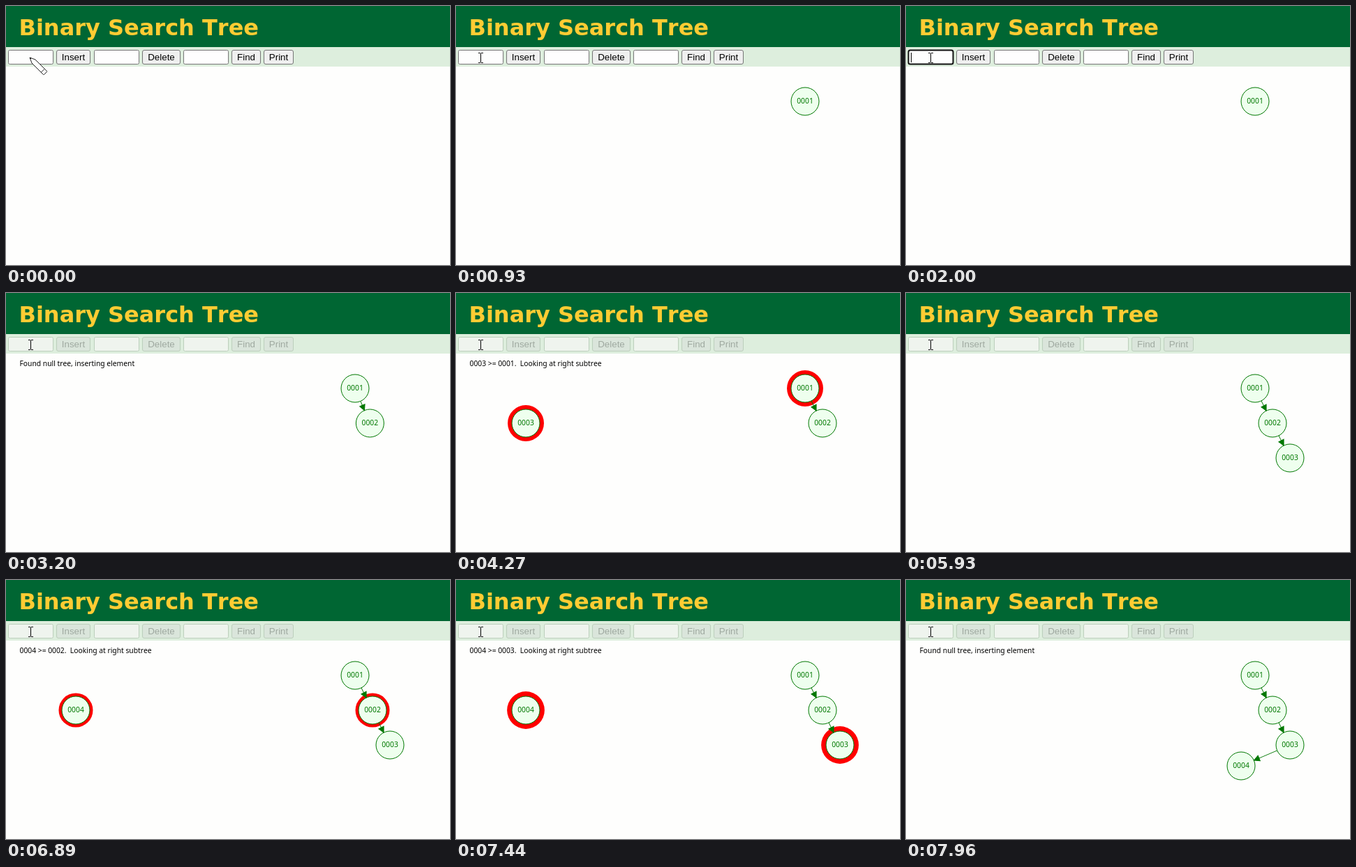
Animation, 636 px wide and 372 px high, one loop 8000 ms. Source, as an HTML page with a canvas:

```html
<!DOCTYPE html>
<html lang="en">
<head>
<meta charset="utf-8">
<title>Binary Search Tree</title>
<style>
  html, body { margin: 0; width: 100%; height: 100%; overflow: hidden; background: #fefefd; }
  canvas { display: block; }
</style>
</head>
<body>
<canvas id="stage" width="636" height="372"></canvas>
<script>
const ctx = document.getElementById('stage').getContext('2d');
const LOOP = 8000, RADIUS = 20, GREEN = '#007700';
const SMALL = '10.3px "Noto Sans", sans-serif';
const CONTROL = '13.33px "Liberation Sans", Arial, sans-serif';

// Times in ms: the user's actions, then the phases of each insertion.
const inserts = [
  { id: 1, focus: 70, typed: 440, enter: 580, shown: 580, end: 890 },
  { id: 2, focus: 2000, typed: 2200, enter: 2370, shown: 2370, compare: 2680, block: 230, move: 2970, moved: 3203, end: 3310 },
  { id: 3, focus: 3510, typed: 3680, enter: 3820, shown: 3890, compare: 4100, block: 290, move: 5100, moved: 5345, end: 5410 },
  { id: 4, focus: 5650, typed: 5720, enter: 5930, shown: 6000, compare: 6240, block: 285, move: 7765, moved: 8010, end: 8100 }
];
const inputs = [3, 126, 254];
const buttons = [['Insert', 72, 49], ['Delete', 195, 55], ['Find', 323, 42], ['Print', 369, 43]];

const name = id => String(id).padStart(4, '0');
const home = id => ({ x: 475 + 25 * id, y: 87 + 50 * id });
const clamp01 = v => Math.max(0, Math.min(1, v));
const mix = (a, b, k) => ({ x: a.x + (b.x - a.x) * k, y: a.y + (b.y - a.y) * k });

function text(str, x, y, font, color, align = 'left') {
  ctx.font = font;
  ctx.fillStyle = color;
  ctx.textAlign = align;
  ctx.fillText(str, x, y);
}

function box(x, y, w, h, r, fill, stroke, line = 1) {
  ctx.beginPath();
  ctx.roundRect(x, y, w, h, r);
  ctx.fillStyle = fill;
  ctx.fill();
  ctx.strokeStyle = stroke;
  ctx.lineWidth = line;
  ctx.stroke();
}

function polygon(points) {
  ctx.beginPath();
  points.forEach(([x, y]) => ctx.lineTo(x, y));
  ctx.closePath();
}

function disc(p, r) {
  ctx.beginPath();
  ctx.arc(p.x, p.y, r, 0, 2 * Math.PI);
}

function drawNode(id, p, glow) {
  if (glow) {
    disc(p, RADIUS + glow);
    ctx.fillStyle = '#ff0000';
    ctx.fill();
  }
  disc(p, RADIUS);
  ctx.fillStyle = '#eeffee';
  ctx.fill();
  ctx.strokeStyle = GREEN;
  ctx.lineWidth = 1;
  ctx.stroke();
  text(name(id), p.x, p.y + 3, SMALL, GREEN, 'center');
}

function drawLink(from, to) {
  const angle = Math.atan2(to.y - from.y, to.x - from.x);
  const length = Math.hypot(to.x - from.x, to.y - from.y) - RADIUS;
  ctx.save();
  ctx.translate(from.x, from.y);
  ctx.rotate(angle);
  ctx.beginPath();
  ctx.moveTo(RADIUS, 0);
  ctx.lineTo(length, 0);
  ctx.strokeStyle = ctx.fillStyle = GREEN;
  ctx.lineWidth = 1;
  ctx.stroke();
  polygon([[length, 0], [length - 8, -4], [length - 8, 4]]);
  ctx.fill();
  ctx.stroke();
  ctx.restore();
}

function drawToolbar(t) {
  ctx.fillStyle = '#006633';
  ctx.fillRect(0, 0, 636, 59);
  ctx.fillStyle = '#ddeedd';
  ctx.fillRect(0, 59, 636, 28);
  text('Binary Search Tree', 18.5, 42, 'bold 32px "DejaVu Sans", Verdana, sans-serif', '#ffcc33');

  const disabled = inserts.some(i => t >= i.enter && t < i.end);
  const border = disabled ? '#bccfbc' : '#767676';
  for (const x of inputs) box(x + .5, 63.5, 64, 20, 2, disabled ? '#eff4ee' : '#fefefe', border);
  for (const [label, x, w] of buttons) {
    box(x + .5, 63.5, w - 1, 20, 2.5, disabled ? '#dae5db' : '#efefef', border);
    text(label, x + w / 2, 78, CONTROL, disabled ? '#9fa9a0' : '#000', 'center');
  }

  const active = inserts.find(i => t >= i.focus && t < i.enter);
  if (!active) return;
  box(3.5, 63.5, 64, 20, 2.5, '#fefefe', '#101010', 2);
  const typed = t >= active.typed;
  if (typed) text(active.id, 6.5, 78, CONTROL, '#000');
  ctx.fillStyle = '#000';
  ctx.fillRect(typed ? 14 : 7, 67, 1, 14);
}

function drawPencil() {
  polygon([[34, 74], [42, 77], [58.5, 93.5], [58.5, 94.5], [54.5, 98.5], [53.5, 98.5], [37, 82]]);
  ctx.fillStyle = '#fff';
  ctx.fill();
  ctx.strokeStyle = '#222';
  ctx.lineWidth = 1;
  ctx.stroke();
  ctx.beginPath();
  ctx.moveTo(50.5, 95);
  ctx.lineTo(55, 90.5);
  ctx.moveTo(34, 74);
  ctx.lineTo(36, 76);
  ctx.stroke();
}

function drawTextCursor() {
  ctx.fillStyle = '#000';
  ctx.fillRect(35, 68, 1, 13);
  for (const y of [67, 81]) {
    ctx.fillRect(32, y, 3, 1);
    ctx.fillRect(36, y, 3, 1);
  }
}

// Highlight width swings between 3 and 7 px.
const pulse = t => 3 + Math.abs((t - 6575 + 8400) % 1680 - 840) * -1 / 210 + 4;

function drawTree(t) {
  const places = {}, glowing = new Set(), links = [];
  let message = '', ring = null;

  for (const item of inserts) {
    if (t < item.shown) break;
    const { id } = item;
    const busy = t < item.end;
    places[id] = home(id);
    if (busy) message = 'Inserting ' + name(id);
    if (id === 1) continue;

    places[id] = mix({ x: 100, y: 187 }, home(id), clamp01((t - item.move) / (item.moved - item.move)));
    if (t < item.compare) continue;

    const phase = (t - item.compare) / item.block;
    const step = Math.floor(phase);
    if (step >= 2 * id - 3) {
      links.push([id - 1, id]);
      if (busy) message = 'Found null tree, inserting element';
      continue;
    }
    // Even steps compare with a node, odd steps walk to its child.
    const visited = 1 + Math.floor(step / 2);
    message = `${name(id)} >= ${name(visited)}.  Looking at right subtree`;
    if (step % 2) ring = mix(home(visited), home(visited + 1), phase - step);
    else glowing.add(visited).add(id);
  }

  for (const id in places) drawNode(id, places[id], glowing.has(+id) ? pulse(t) : 0);
  if (ring) {
    disc(ring, RADIUS);
    ctx.strokeStyle = GREEN;
    ctx.lineWidth = 4;
    ctx.stroke();
  }
  for (const [a, b] of links) drawLink(places[a], places[b]);
  text(message, 19.5, 105, SMALL, '#000');
}

function render(t) {
  ctx.fontKerning = 'none';
  ctx.fillStyle = '#fefefd';
  ctx.fillRect(0, 0, 636, 372);
  drawToolbar(t);
  drawTree(t);
  if (t < 30) drawPencil();
  else drawTextCursor();
}

const start = performance.now();
function frame() {
  render((performance.now() - start) % LOOP);
  requestAnimationFrame(frame);
}
frame();
</script>
</body>
</html>
```
